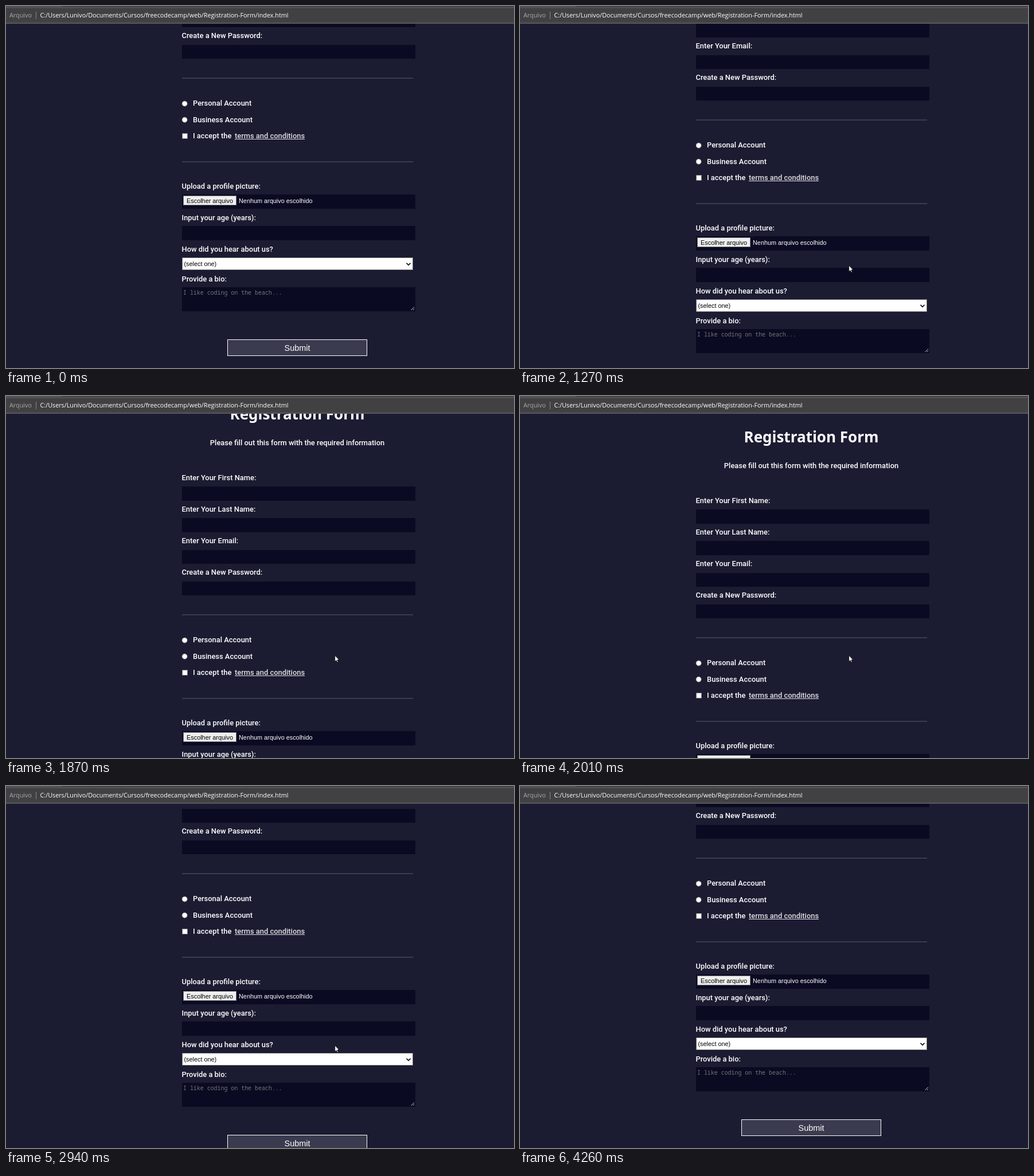
Recreate the animation shown at these times as an HTML page with a canvas. Size 886 px wide and 632 px high, loop 4.33 s.

```html
<!DOCTYPE html>
<html lang="en">
<head>
<meta charset="utf-8">
<title>Registration Form</title>
<style>
  html, body { margin: 0; width: 100%; height: 100%; overflow: hidden; background: #1b1b32; }
  canvas { display: block; }
</style>
</head>
<body>
<canvas id="stage" width="886" height="632"></canvas>
<script>
const ctx = document.getElementById('stage').getContext('2d');
const LOOP = 4330;
const TICK = 70; // motion is refreshed this often, in ms
const LEFT = 307;
const RIGHT = 710;
const CENTER = 508;
const SELECT_TOP = 715;
const SELECT_HEIGHT = 22;

const BODY = '500 12.9px Roboto, sans-serif';
const TITLE = 'bold 26px "Noto Sans", sans-serif';
const CONTROL = '10.87px "Liberation Sans", Arial, sans-serif';
const BUTTON = '14.4px "Liberation Sans", Arial, sans-serif';
const MONO = '9.93px "Noto Sans Mono", monospace';
const CHROME = '10.8px "Open Sans", sans-serif';

// lead: share of the easing already done when the movement first shows
const scrolling = [
  { at: 1110, duration: 420, lead: 0.043, to: [31.5] },
  { at: 1870, duration: 140, lead: 0.31, to: [-20] },
  { at: 2800, duration: 180, lead: 0.157, to: [276] }
];
const pointing = [
  { at: 70, duration: 380, lead: 0.355, to: [573.7, 453] },
  { at: 3390, duration: 200, lead: 0.15, to: [710, 690] },
  { at: 4260, duration: TICK, lead: 1, to: [842, 631] }
];

const smooth = u => u * u * (3 - 2 * u);

function glide(start, moves, t) {
  let position = start;
  for (const { at, duration, lead, to } of moves) {
    if (t < at) break;
    const elapsed = Math.floor((t - at) / TICK) * TICK;
    const progress = smooth(lead + (1 - lead) * Math.min(1, elapsed / duration));
    position = position.map((from, i) => from + (to[i] - from) * progress);
  }
  return position;
}

// Edges are snapped to whole pixels.
function rect(x, y, w, h, color) {
  const left = Math.round(x), top = Math.round(y);
  ctx.fillStyle = color;
  ctx.fillRect(left, top, Math.round(x + w) - left, Math.round(y + h) - top);
}

function box(x, y, w, h, fill, border) {
  rect(x, y, w, h, border);
  rect(x + 1, y + 1, w - 2, h - 2, fill);
}

function text(str, x, baseline, font = BODY, color = '#fff', align = 'left') {
  ctx.font = font;
  ctx.fillStyle = color;
  ctx.textAlign = align;
  ctx.fillText(str, x, Math.round(baseline));
  return ctx.measureText(str).width;
}

function line(points, color, width) {
  ctx.beginPath();
  points.forEach(([x, y]) => ctx.lineTo(x, y));
  ctx.strokeStyle = color;
  ctx.lineWidth = width;
  ctx.stroke();
}

const label = (str, middle, x = LEFT - 0.5) => text(str, x, middle + 4.6);
const field = (y, h = 24.7) => rect(LEFT, y, 407, h, '#0a0a23');
const divider = y => rect(LEFT, y, RIGHT - LEFT, 2, '#3b3b4f');

function radio(str, middle) {
  ctx.beginPath();
  ctx.arc(311.6, middle + 0.7, 4.6, 0, Math.PI * 2);
  ctx.fillStyle = '#fff';
  ctx.fill();
  ctx.strokeStyle = '#767676';
  ctx.lineWidth = 0.8;
  ctx.stroke();
  label(str, middle, 326);
}

function drawAccount() {
  text('Registration Form', CENTER, 61, TITLE, '#fff', 'center');
  text('Please fill out this form with the required information', CENTER, 106, BODY, '#fff', 'center');

  ['Enter Your First Name:', 'Enter Your Last Name:', 'Enter Your Email:', 'Create a New Password:']
    .forEach((str, i) => {
      label(str, 162.5 + i * 55.1);
      field(178.3 + i * 55.1);
    });
  divider(401);

  radio('Personal Account', 445.8);
  radio('Business Account', 474);
  box(LEFT, 498, 10, 10, '#fff', '#767676');
  label('I accept the', 502.5, 326);
  const width = text('terms and conditions', 399, 507, BODY, '#dfdfe2');
  rect(399, 508, width, 1, '#dfdfe2');
  divider(547);
}

function drawDetails(hovered) {
  label('Upload a profile picture:', 590);
  field(605);
  box(309, 607, 93, 17, '#efefef', '#767676');
  text('Escolher arquivo', 355.5, 619.5, CONTROL, '#000', 'center');
  text('Nenhum arquivo escolhido', 406, 619.5, CONTROL);

  label('Input your age (years):', 645.5);
  field(660.2);

  label('How did you hear about us?', 700);
  box(LEFT, SELECT_TOP, RIGHT - LEFT, SELECT_HEIGHT, '#fff', hovered ? '#4f4f4f' : '#767676');
  text('(select one)', 310.5, 730, CONTROL, '#000');
  line([[698.5, 724.8], [702, 728.3], [705.5, 724.8]], '#000', 1.6);

  label('Provide a bio:', 752);
  field(767.3, 41.7);
  text('I like coding on the beach...', 309, 780, MONO, '#757575');
  line([[706.5, 807], [712, 801.5]], '#d0d0d4', 1);
  line([[709.8, 807], [712, 804.8]], '#d0d0d4', 1);

  box(386, 858.4, 244, 28.8, '#3b3b4f', '#fff');
  text('Submit', CENTER, 877.6, BUTTON, '#fff', 'center');
}

function drawHeader() {
  rect(0, 0, 886, 31, '#414143');
  rect(0, 0, 886, 1, '#343436');
  rect(0, 0, 97, 1, '#525254');
  rect(0, 1, 886, 3, '#505052');
  rect(0, 28, 886, 2, '#4b4b4d');
  rect(0, 30, 886, 1, '#606062');
  text('Arquivo', 6, 20, CHROME, '#a8a8aa');
  rect(52, 10, 1, 13, '#858587');
  text('C:/Users/Lunivo/Documents/Cursos/freecodecamp/web/Registration-Form/index.html',
    59.5, 20, CHROME);
}

function drawPointer(x, y) {
  ctx.save();
  ctx.translate(x, y);
  ctx.beginPath();
  [[0, 0], [0, 10.8], [2.4, 8.6], [4.1, 12.3], [5.7, 11.6], [4.1, 8], [7.2, 7.6]]
    .forEach(([px, py]) => ctx.lineTo(px, py));
  ctx.closePath();
  ctx.fillStyle = '#fff';
  ctx.fill();
  ctx.strokeStyle = '#000';
  ctx.lineWidth = 0.8;
  ctx.stroke();
  ctx.restore();
}

function draw(t) {
  const scroll = Math.round(glide([276], scrolling, t)[0]);
  const [x, y] = glide([900, 676], pointing, t);
  const selectTop = SELECT_TOP - scroll;
  const hovered = x > LEFT && x < RIGHT && y > selectTop && y < selectTop + SELECT_HEIGHT;

  rect(0, 0, 886, 632, '#1b1b32');
  ctx.save();
  ctx.translate(0, -scroll);
  drawAccount();
  drawDetails(hovered);
  ctx.restore();
  drawHeader();
  drawPointer(x, y);
}

const begin = performance.now();
function tick() {
  draw((performance.now() - begin) % LOOP);
  requestAnimationFrame(tick);
}
tick();
</script>
</body>
</html>
```
